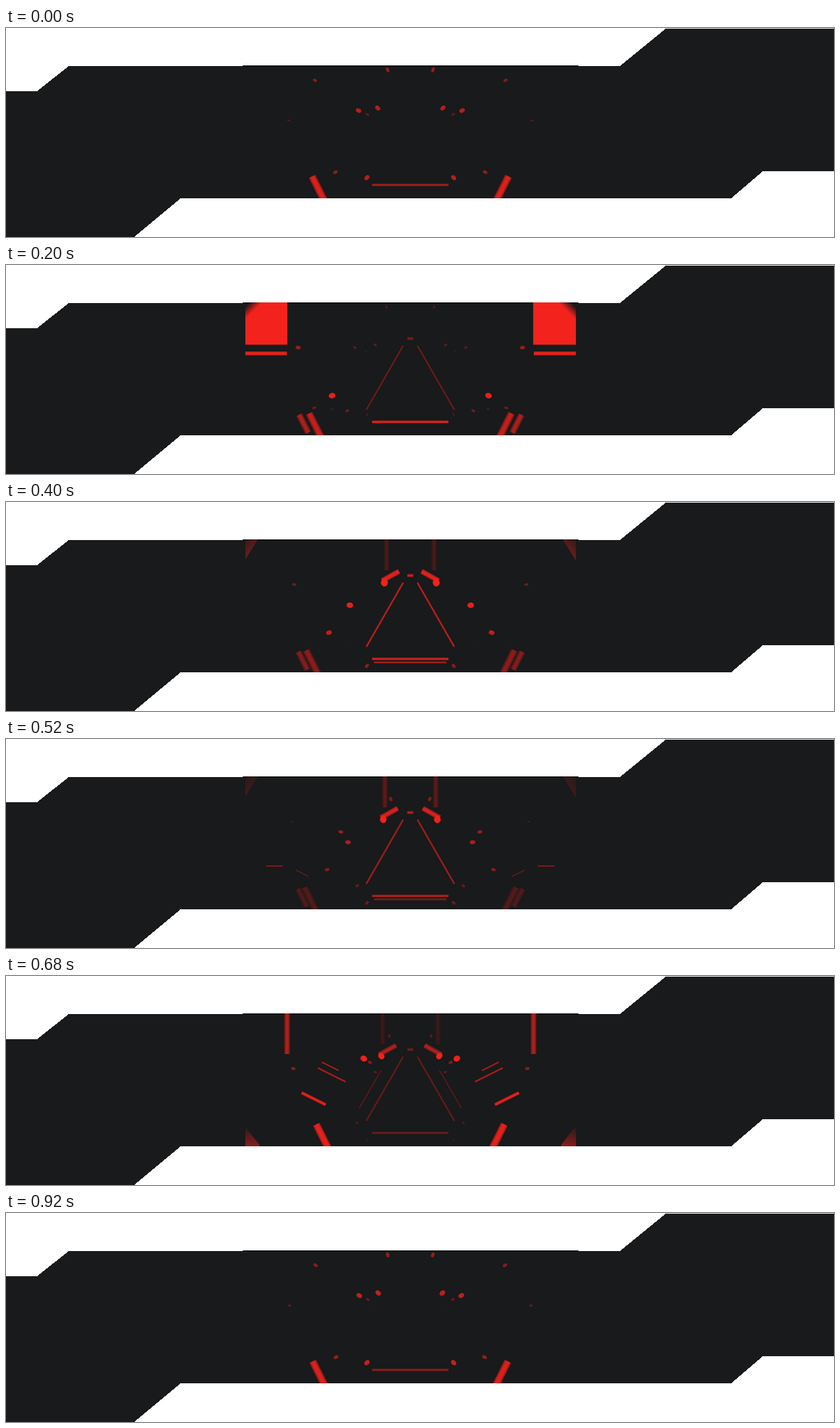
An HTML page with a canvas for the animation above (0.96 s loop, 1280 px wide and 324 px high).

```html
<!DOCTYPE html>
<html lang="en">
<head>
<meta charset="utf-8">
<title>Tunnel lights</title>
<style>
  html, body { margin: 0; width: 100%; height: 100%; overflow: hidden; background: #fff; }
  svg, .view, canvas { position: absolute; left: 0; top: 0; width: 1280px; height: 324px; }
  .view { clip-path: inset(58px 399px 60px 370px); }
  canvas { filter: blur(.7px); }
</style>
</head>
<body>
<svg viewBox="0 0 1280 324" shape-rendering="crispEdges">
  <path fill="#181a1b" d="M0 98H48L97 59H366V58H885V59H949L1020 1H1280V222H1170L1121 264H270L198 324H0Z"/>
  <path fill="#050606" d="M366 58H885V59H366Z"/>
</svg>
<div class="view"><canvas width="1280" height="324"></canvas></div>
<script>
const LOOP = 960, STEP = 40, AXIS = 625, HORIZON = 165;
const RED = '#f3221c';
const ctx = document.querySelector('canvas').getContext('2d');
const lights = [];

// on, life, rise: when a light starts, how long it lasts, share spent rising
// flow: drift to the outside in px per 100 ms
function light(draw, opts) {
  lights.push({ draw, level: 1, rise: .15, flow: 0, ...opts });
}

function glow({ life, level, rise }, age) {
  const p = age / life;
  return p < 1 ? Math.min(1, level * Math.min(1, p / rise) * (1 - p * p)) : 0;
}

// soft-edged stroke, built from three widths
function line(x1, y1, x2, y2, width, opts) {
  light(a => {
    ctx.globalAlpha = a * .62;
    ctx.beginPath();
    ctx.moveTo(x1, y1);
    ctx.lineTo(x2, y2);
    for (const k of [1.25, .9, .55]) {
      ctx.lineWidth = width * k;
      ctx.stroke();
    }
  }, opts);
}

// small lamp, wider when brighter, pointing to the vanishing point
function spark(x, y, opts) {
  const turn = Math.atan2(HORIZON - y, AXIS - x);
  light(a => {
    const r = 2 + 3.4 * a;
    ctx.beginPath();
    ctx.ellipse(x, y, r, r * (.45 + .4 * a), turn, 0, 7);
    ctx.fill();
  }, { flow: 2.4, ...opts });
}

function poly(points, fill, opts) {
  light(() => {
    ctx.fillStyle = fill;
    ctx.beginPath();
    points.forEach(p => ctx.lineTo(...p));
    ctx.fill();
  }, opts);
}

function fade(x1, y1, x2, y2, from, to) {
  const g = ctx.createLinearGradient(x1, y1, x2, y2);
  const end = Math.round(to * 255).toString(16).padStart(2, '0');
  const start = Math.round(from * 255).toString(16).padStart(2, '0');
  g.addColorStop(0, RED + start);
  g.addColorStop(1, RED + end);
  return g;
}

// side panels
const panel = { on: 80, life: 280, level: 1.3 };
poly([[360, 50], [435, 50], [435, 123.5], [360, 123.5]], fade(372, 62, 382, 72, 0, 1), panel);
line(360, 137, 434, 137, 5, panel);
poly([[360, 50], [394, 50], [360, 106]], fade(364, 58, 379, 74, .2, 1), { on: 260, life: 340, level: .4 });
line(434.5, 50, 434.5, 121, 7, { on: 600, life: 160, level: .7 });
poly([[360, 228], [372, 236], [392, 262], [392, 270], [360, 270]], fade(376, 232, 378, 264, .1, .9),
  { on: 600, life: 160, level: .75 });

// lower struts
line(481.5, 230, 500.5, 268, 9, { on: 600, life: 960, rise: .04, flow: 2.3 });
line(454, 232, 468, 260, 8, { on: 60, life: 540, level: .55, flow: .6 });

// pyramid
const edge = { on: 140, life: 660, level: .75, rise: .25 };
const ghost = { on: 700, life: 170, level: .45 };
line(614, 125, 557, 224.5, 2.4, edge);
line(623, 120, 559, 232, 2, ghost);
line(616, 126, 563, 218, 1.2, { ...ghost, level: .2 });
line(580, 146, 546, 205, 1.4, { on: 620, life: 240, level: .28 });
spark(558, 232, { on: 700, life: 520, level: .95, flow: 0 });
spark(558, 254, { on: 280, life: 460, level: .55, flow: 0 });
line(620.5, 114, 640, 114, 4, { on: 140, life: 660, rise: .3, level: 0 });
line(620.5, 114, 629.5, 114, 4, { ...edge, level: .8 });

// floor, clipped at the axis and mirrored
line(566, 243.3, 640, 243.3, 3.2, { on: 800, life: 940, rise: .4, level: 1.2 });
line(569, 248.7, 640, 248.7, 2.4, { on: 280, life: 380, level: .6 });

// upper brackets
const lamp = { on: 580, life: 700, rise: .1 };
const bracket = { on: 240, life: 640, flow: 1.6 };
line(584, 122, 610, 107.5, 6.5, bracket);
spark(588, 124, { ...bracket, level: 1.2 });
spark(587, 126, { ...bracket, level: 1.1 });
spark(582.2, 124, { ...lamp, flow: 2 });
spark(556, 128, { ...lamp, flow: 2.9 });
spark(564, 134, { ...lamp, flow: 1.4, level: .45 });
spark(572, 149, { ...lamp, flow: 1.2, level: .3, life: 420 });
line(591, 50, 591, 106, 7, { on: 280, life: 500, level: .24, rise: .4, flow: 2.2 });

// wall lamps
spark(506, 202.5, { on: 120, life: 560 });
spark(534, 160, { on: 300, life: 380 });
spark(519, 144, { on: 460, life: 160, level: .65 });
spark(515, 223.5, { on: 720, life: 540, level: .65, rise: .3 });
spark(529, 226, { on: 140, life: 300, level: .4 });
spark(478, 221.5, { on: 140, life: 300, level: .4 });
spark(543, 227.5, { on: 460, life: 380, level: .35, flow: 0 });
spark(454, 128, { on: 120, life: 480, level: .6, flow: 3 });
spark(446, 143.5, { on: 600, life: 500, level: .5 });
spark(481, 81, { on: 820, life: 360, level: .55 });
spark(591, 65, { on: 820, life: 440, level: .6, flow: .8 });
spark(596, 93, { on: 440, life: 380, level: .5, flow: 1.4 });

// wall streaks share one slope
const streak = (x, y, length, width, level, on = 620) =>
  line(x, y, x + length, y + length / 2, width, { on, life: 210, level, flow: 1.5 });
streak(458, 181, 37, 4, 1.05);
streak(483, 142.5, 43, 2.4, .6);
streak(489, 133.5, 26, 2, .6);
streak(449, 203, 20, 1.8, .25, 440);
line(402, 197, 428, 197, 1.8, { on: 440, life: 160, level: .5 });

function half(t, mirror) {
  ctx.save();
  if (mirror) ctx.transform(-1, 0, 0, 1, 2 * AXIS, 0);
  ctx.beginPath();
  ctx.rect(0, 0, AXIS, 324);
  ctx.clip();
  for (const item of lights) {
    const age = (t - item.on + LOOP) % LOOP;
    const a = glow(item, age);
    if (a < .01) continue;
    ctx.save();
    ctx.translate(-item.flow * age / 100, 0);
    ctx.globalAlpha = a;
    ctx.fillStyle = ctx.strokeStyle = RED;
    item.draw(a);
    ctx.restore();
  }
  ctx.restore();
}

function render() {
  const t = Math.floor(performance.now() % LOOP / STEP) * STEP;
  ctx.clearRect(0, 0, 1280, 324);
  half(t, false);
  half(t, true);
  requestAnimationFrame(render);
}
render();
</script>
</body>
</html>
```
